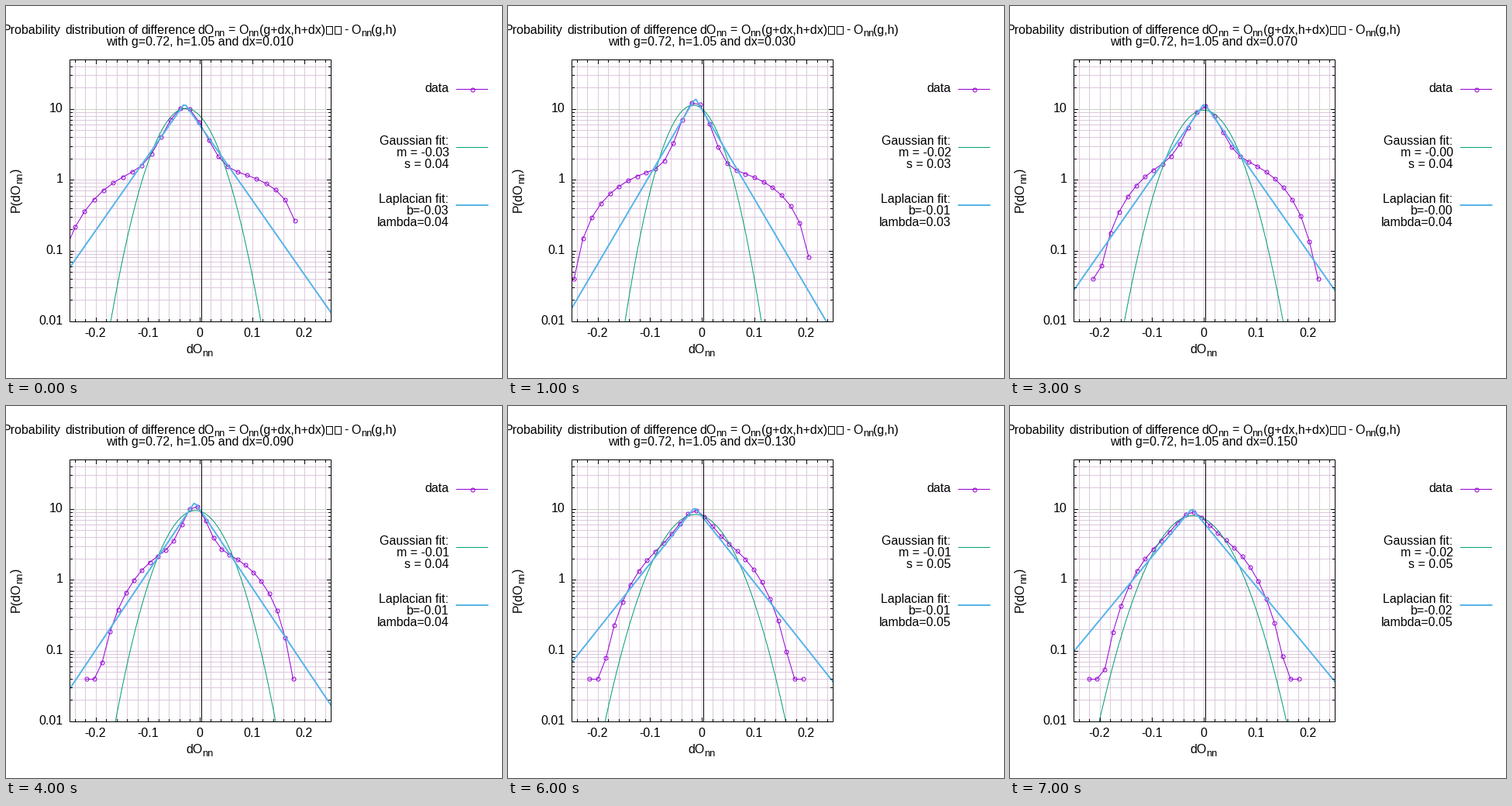
A matplotlib script that plays this animation: 640 px wide and 480 px high, repeating every 8 s.

```python
import numpy as np
import matplotlib.pyplot as plt
from matplotlib.animation import FuncAnimation
from matplotlib.patches import Rectangle

W, H, DPI = 640, 480, 100
PT = 72 / DPI  # points per pixel
LEFT, RIGHT, TOP, BOTTOM = 82, 419, 69, 407
DECADE = (BOTTOM - TOP) / np.log10(50 / 0.01)
PURPLE, GREEN, BLUE = "#9400d3", "#009e73", "#56b4e9"
PINK, PALE_GREEN = "#dcc8dc", "#c6d6bf"
FRAMES, POINTS = 8, 27

plt.rcParams["font.family"] = "Liberation Sans"

fig = plt.figure(figsize=(W / DPI, H / DPI), dpi=DPI, facecolor="white")
ax = fig.add_axes([0, 0, 1, 1])
# Whole numbers are pixel centres.
ax.set_xlim(-0.5, W - 0.5)
ax.set_ylim(H - 0.5, -0.5)
ax.axis("off")


def px(x):
    return LEFT + (x + 0.25) / 0.5 * (RIGHT - LEFT)


def py(p):
    return BOTTOM - DECADE * (np.log10(p) + 2)


def text(x, y, s, size=16, **kw):
    return ax.text(x - 1, y - 0.5, s, fontsize=size * PT, color="black", **kw)


def line(xs, ys, color="black", width=1, **kw):
    return ax.plot(xs, ys, color=color, lw=width * PT, snap=False,
                   solid_capstyle="projecting", **kw)[0]


def box(x, y, w, h, **kw):
    ax.add_patch(Rectangle((x, y), w, h, fill=False, lw=PT, ec="black",
                           snap=False, **kw))


def draw_grid_and_ticks():
    for k in range(-12, 13):
        x = round(px(k * 0.02))
        size = 5 if k % 5 == 0 else 3
        line([x, x], [TOP, BOTTOM], PINK)
        line([x, x], [BOTTOM, BOTTOM - size], zorder=6)
        line([x, x], [TOP, TOP + size], zorder=6)
    for e in (-2, -1, 0, 1):
        for d in range(1, 10):
            p = d * 10.0 ** e
            if 0.01 < p < 50:
                y = round(py(p))
                size = 5 if d == 1 else 3
                line([LEFT, RIGHT], [y, y], PALE_GREEN if p == 10 else PINK)
                line([LEFT, LEFT + size], [y, y], zorder=6)
                line([RIGHT, RIGHT - size], [y, y], zorder=6)
    box(LEFT, TOP, RIGHT - LEFT, BOTTOM - TOP, zorder=6)
    line([252, 252], [TOP, BOTTOM], zorder=6)


def draw_labels():
    for x, s in ((-4, "Probability"), (76.5, "distribution"), (157.5, "of"),
                 (175, "difference"), (248, "dO"), (287, "="), (300.5, "O"),
                 (327, "(g+dx,h+dx)"), (436.5, "-"), (446, "O"),
                 (472, "(g,h)")):
        text(x, 36, s)
    for x in (268.5, 313, 458.5):
        text(x, 39, "nn", 12.8)
    for x in (413, 424):
        box(x, 26, 8, 10)
    for k in range(-2, 3):
        text(px(k / 10), 427, f"{k / 10:g}", ha="center")
    for p in (0.01, 0.1, 1, 10):
        text(74, round(py(p)) + 4, f"{p:g}", ha="right")
    text(233, 448, "dO")
    text(254, 452, "nn", 12.8)
    for x, y, s, size in ((18, 266, "P(dO", 16), (22, 229, "nn", 12.8),
                          (18, 215, ")", 16)):
        text(x, y, s, size, rotation=90, rotation_mode="anchor")


def draw_key():
    text(572, 111, "data", ha="right")
    text(572, 179, "Gaussian fit:", ha="right")
    text(572, 254, "Laplacian fit:", ha="right")
    line([581, 621], [107, 107], PURPLE)
    line([601], [107], PURPLE, **circles)
    line([581, 621], [182, 182], GREEN)
    line([581, 621], [256.5, 256.5], BLUE, 2)


circles = dict(marker="o", ms=5 * PT, mfc="none", mec=PURPLE, mew=PT)
draw_grid_and_ticks()
draw_labels()
draw_key()

subtitle = text(250.5, 51, "", ha="center")
notes = [text(572, y, "", ha="right") for y in (194, 209, 269, 284)]
data = line([], [], PURPLE, zorder=3, **circles)
bell = line([], [], GREEN, zorder=4)
tent = line([], [], BLUE, 2, zorder=5)
window = Rectangle((LEFT, TOP), RIGHT - LEFT, BOTTOM - TOP,
                   transform=ax.transData)
for curve in (data, bell, tent):
    curve.set_clip_path(window)

# Key values over the step size dx; those between are interpolated.
KEY_DX = (0.01, 0.03, 0.05, 0.09, 0.11, 0.15)
KEYS = dict(
    m=(-0.0282, -0.0178, 0.0067, -0.0096, -0.0049, -0.0223),
    s=(0.0386, 0.0348, 0.0406, 0.0414, 0.0453, 0.049),
    b=(-0.0305, -0.0141, 0.01, -0.0109, -0.0056, -0.0242),
    lam=(0.0412, 0.03457, 0.04275, 0.03945, 0.04468, 0.04866),
    start=(-0.295, -0.2462, -0.2077, -0.2188, -0.2107, -0.2218),
    end=(0.1803, 0.2033, 0.2576, 0.1773, 0.204, 0.1803),
    shoulder=(1.6, 1.6, 1.7, 3, 3.5, 5),
    core=(0.038, 0.029, 0.039, 0.025, 0.035, 0.033),
    fall_left=(2.6, 1.6, 1.3, 3.6, 3.3, 4.3),
    fall_right=(0.75, 1.25, 1.85, 2, 3.3, 3.9),
)


def gaussian(x, m, s):
    return np.exp(-((x - m) / s) ** 2 / 2) / (s * np.sqrt(2 * np.pi))


def laplacian(x, b, lam):
    return np.exp(-np.abs(x - b) / lam) / (2 * lam)


def histogram(x, k):
    """A narrow core on a broad shoulder that falls off to both ends."""
    u = (2 * x - k["start"] - k["end"]) / (1.05 * (k["end"] - k["start"]))
    height = 1 / (2 * k["lam"]) - 1 - k["shoulder"]
    core = height * np.exp(-(np.abs(x - k["b"]) / k["core"]) ** 1.7)
    fall = np.where(u < 0, k["fall_left"], k["fall_right"])
    return np.maximum((core + k["shoulder"]) * (1 - u * u) ** fall, 0.04)


grid = np.linspace(-0.25, 0.25, 100)


def update(i):
    dx = 0.01 + 0.02 * i
    k = {name: np.interp(dx, KEY_DX, row) for name, row in KEYS.items()}
    subtitle.set_text(f"with g=0.72, h=1.05 and dx={dx:.3f}")
    labels = (f"m = {k['m']:.2f}", f"s = {k['s']:.2f}",
              f"b={k['b']:.2f}", f"lambda={k['lam']:.2f}")
    for note, label in zip(notes, labels):
        note.set_text(label)
    x = np.linspace(k["start"], k["end"], POINTS)
    data.set_data(px(x), py(histogram(x, k)))
    bell.set_data(px(grid), py(gaussian(grid, k["m"], k["s"])))
    tent.set_data(px(grid), py(laplacian(grid, k["b"], k["lam"])))
    return [subtitle, *notes, data, bell, tent]


anim = FuncAnimation(fig, update, frames=FRAMES, interval=1000,
                     repeat=True, repeat_delay=0)
plt.show()
```
